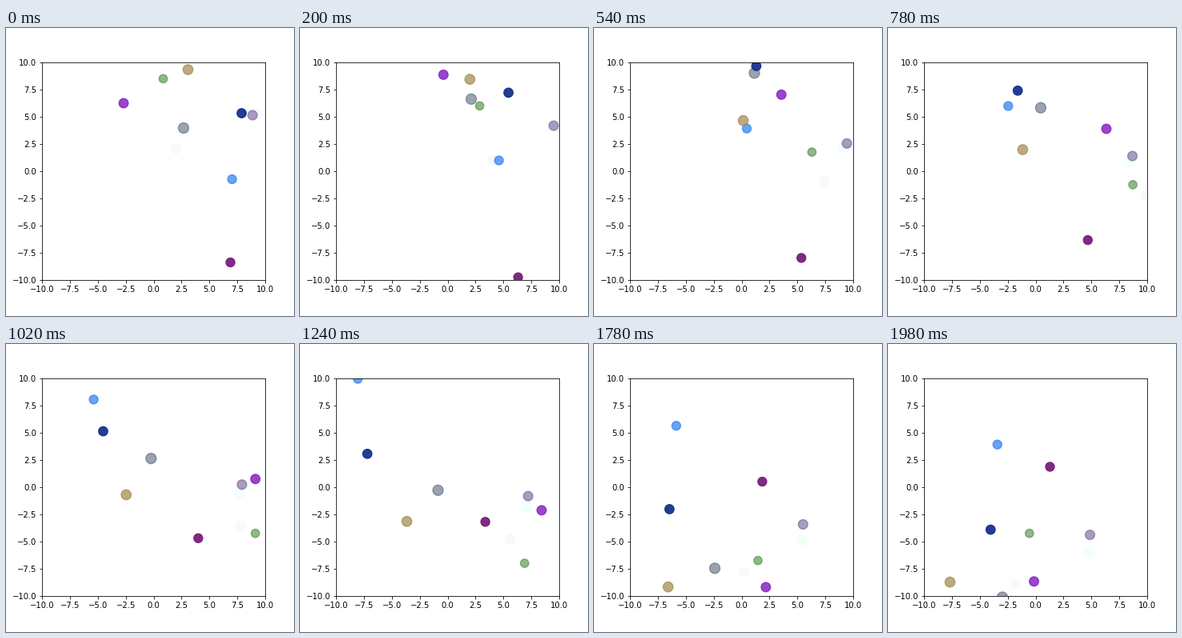
Write a matplotlib script that moves like this. It is 360x360 px and loops after 2 s.

```python
import numpy as np
import matplotlib.pyplot as plt
from matplotlib.animation import FuncAnimation

FRAMES, INTERVAL = 100, 20
LIMIT = 10
EDGE = 1.5

# x, y, vx, vy, outer radius in px, colour, alpha
BALLS = [
    (2.007, 2.105, 0.2014, -0.1111, 6.5, "#f5f5f5", 0.50),
    (9.233, 5.305, 0.0610, -0.1141, 7.1, "#e8fff8", 0.55),
    (2.688, 3.981, -0.0572, 0.2659, 7.2, "#5a667a", 0.60),
    (0.860, 8.514, 0.2014, -0.2500, 5.9, "#539248", 0.65),
    (8.867, 5.158, 0.0634, -0.0963, 6.6, "#715c94", 0.60),
    (7.032, -0.728, -0.2432, 0.1726, 6.2, "#3684f2", 0.75),
    (3.082, 9.352, -0.1086, 0.2231, 6.9, "#a2884a", 0.70),
    (-2.688, 6.262, 0.2315, 0.2618, 6.5, "#8725c4", 0.85),
    (6.882, -8.381, -0.0565, -0.1369, 6.2, "#791f7b", 0.95),
    (7.885, 5.342, -0.2432, 0.1886, 6.4, "#18328c", 0.95),
]


def bounce(pos, vel):
    """Positions per frame; a ball turns back after stepping past a wall."""
    pos, vel = pos.copy(), vel.copy()
    track = [pos.copy()]
    for _ in range(FRAMES - 1):
        pos += vel
        vel[np.abs(pos) > LIMIT] *= -1
        track.append(pos.copy())
    return track


state = np.array([b[:4] for b in BALLS])
track = bounce(state[:, :2], state[:, 2:])
radii = np.array([b[4] for b in BALLS])
colors = [(b[5], b[6]) for b in BALLS]

fig = plt.figure(figsize=(5, 5), dpi=72, facecolor="white")
fig.subplots_adjust(left=0.125, right=0.9, bottom=0.125, top=0.88)
ax = fig.add_subplot()
ticks = np.linspace(-LIMIT, LIMIT, 9)
ax.set(xlim=(-LIMIT, LIMIT), ylim=(-LIMIT, LIMIT), xticks=ticks, yticks=ticks)

dots = ax.scatter(*track[0].T, s=(2 * radii - EDGE) ** 2, c=colors,
                  edgecolors="face", linewidths=EDGE)


def update(i):
    dots.set_offsets(track[i])
    return (dots,)


anim = FuncAnimation(fig, update, frames=FRAMES, interval=INTERVAL,
                     repeat=True, repeat_delay=0)
plt.show()
```
